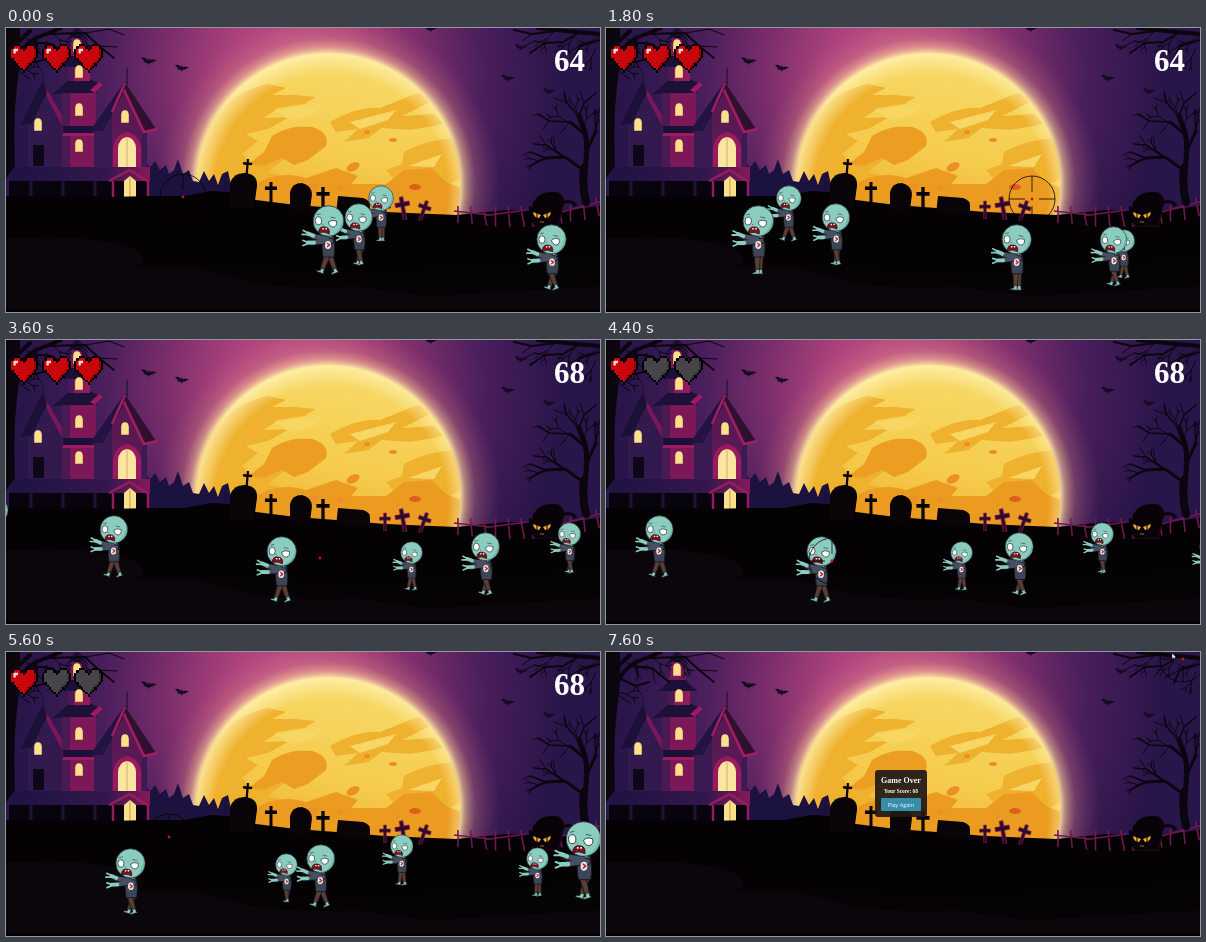
These frames come from a looping animation (594 px wide and 284 px high, 7.7 s). An HTML page:

```html
<!DOCTYPE html>
<html lang="en">
<head>
<meta charset="utf-8">
<title>Graveyard shooter</title>
<style>
  html, body { margin: 0; width: 100%; height: 100%; overflow: hidden; background: #000; }
  svg { display: block; width: 594px; height: 284px; }
  .serif { font-family: "Liberation Serif", serif; font-weight: bold; fill: #fff; }
  .branch { fill: none; stroke: #0b050d; stroke-linecap: round; stroke-linejoin: round; }
</style>
</head>
<body>
<svg viewBox="0 0 594 284">
  <defs>
    <radialGradient id="sky" gradientUnits="userSpaceOnUse" cx="288" cy="45" r="320">
      <stop offset="0" stop-color="#c8558a"/>
      <stop offset=".2" stop-color="#ae437c"/>
      <stop offset=".4" stop-color="#7b2e6b"/>
      <stop offset=".6" stop-color="#491e5c"/>
      <stop offset=".85" stop-color="#28154a"/>
    </radialGradient>
    <radialGradient id="glow" gradientUnits="userSpaceOnUse" cx="322" cy="157" r="172">
      <stop offset=".765" stop-color="#ffeaa8" stop-opacity=".95"/>
      <stop offset=".8" stop-color="#f6c795" stop-opacity=".6"/>
      <stop offset=".86" stop-color="#dd8f86" stop-opacity=".28"/>
      <stop offset="1" stop-color="#c06080" stop-opacity="0"/>
    </radialGradient>
    <radialGradient id="rim" gradientUnits="userSpaceOnUse" cx="325" cy="163" r="139">
      <stop offset=".84" stop-color="#fff2b4" stop-opacity="0"/>
      <stop offset="1" stop-color="#fff2b4" stop-opacity=".85"/>
    </radialGradient>
    <linearGradient id="moon" x1=".6" y1="0" x2=".4" y2="1">
      <stop offset="0" stop-color="#f7db6a"/>
      <stop offset=".4" stop-color="#f5cb4b"/>
      <stop offset=".75" stop-color="#eca42a"/>
    </linearGradient>
    <linearGradient id="porch">
      <stop offset=".1" stop-color="#211344"/>
      <stop offset=".7" stop-color="#35174e"/>
      <stop offset="1" stop-color="#85195a"/>
    </linearGradient>
    <clipPath id="disc"><circle cx="322" cy="157" r="132"/></clipPath>

    <path id="bat" d="M-8-3Q-4-5-1-1L0-3 1-1Q5-3 8 0 4 0 3 2 1 1 0 4-2 1-4 2-5-1-8-3Z" fill="#170a24"/>
    <path id="cross" d="M-1.5 20V8H-6V4.500H-1.500V0H1.500V4.500H6V8H1.500V20Z"/>
    <path id="window" d="M-4 6V-2Q-4-7 0-7T4-2V6Z" fill="#fbe08a"/>
    <g id="heart" shape-rendering="crispEdges">
      <path fill="#000" d="M2 0h3v1h1v1h1v-1h1v-1h3v1h1v1h1v4h-1v1h-1v1h-1v1h-1v1h-1v1h-1v1h-1v-1h-1v-1h-1v-1h-1v-1h-1v-1h-1v-1h-1v-4h1v-1h1z"/>
      <path fill="currentColor" d="M2 1h3v1h1v1h1v-1h1v-1h3v1h1v4h-1v1h-1v1h-1v1h-1v1h-1v1h-1v-1h-1v-1h-1v-1h-1v-1h-1v-1h-1v-4h1z"/>
      <path fill="#000" opacity=".28" d="M11 2h1v4h-1v1h-1v1h-1v1h-1v1h-1v-1h1v-1h1v-1h1v-1h1z"/>
    </g>
  </defs>

  <rect width="594" height="284" fill="url(#sky)"/>
  <circle cx="322" cy="157" r="172" fill="url(#glow)"/>
  <circle cx="322" cy="157" r="132" fill="url(#moon)"/>
  <g clip-path="url(#disc)">
    <path fill="#efb22f" d="M190 160Q190 110 216 80 238 60 262 56L280 60 266 67 288 67 310 69 298 76 272 80 258 90 284 89 262 101 240 106 252 113 236 126 246 135 268 124 282 128 262 144 290 152 262 166 230 182H190Z"/>
    <path fill="#eb9e22" d="M266 108Q284 96 306 99 324 104 320 118L302 132 288 137 276 130 258 138 243 136 258 124Z"/>
    <path fill="#efb22f" d="M324 94Q352 78 374 80L414 64 424 74 396 88 428 86 438 96 404 102 376 100 362 110 338 114 352 101 330 104Z"/>
    <path fill="#efb22f" d="M398 124Q420 112 447 110L456 150 440 158 418 150 390 154 380 142 396 136Z"/>
    <path fill="#eb9c20" d="M250 156Q274 142 300 150L330 140 352 148 345 156 380 156 398 142 426 140 440 154 455 160V190H232L240 170Z"/>
    <path fill="#f7d663" d="M268 82L318 76 308 86 284 92ZM344 94L390 82 382 92 354 101ZM402 138L436 126 428 139Z"/>
    <g fill="#ec8f26">
      <ellipse cx="347" cy="139" rx="7" ry="4" transform="rotate(-25 347 139)"/>
      <ellipse cx="334" cy="160" rx="5" ry="3"/>
      <ellipse cx="361" cy="104" rx="3" ry="2"/>
      <ellipse cx="387" cy="112" rx="4" ry="2"/>
      <ellipse cx="307" cy="158" rx="6" ry="3"/>
      <ellipse cx="409" cy="159" rx="6" ry="3" fill="#dd5d1c"/>
      <circle cx="392" cy="165" r="2"/>
    </g>
    <circle cx="322" cy="157" r="132" fill="url(#rim)"/>
  </g>

  <g id="bats"></g>

  <path fill="#1c1240" d="M132 184V142L139 134 144 139 149 133 154 142 160 137 163 146 168 142 172 131 177 146 183 142 187 153 193 154 198 143 203 153 208 146 212 157 216 146 222 143 225 157 232 161V184Z"/>

  <!-- house -->
  <path fill="#331a4e" d="M22 140V88L38 62 58 88V140Z"/>
  <path fill="#7a1758" d="M40 60L60 94 55 96 36 60Z"/>
  <path fill="#1b1038" d="M14 97L37 52 41 65 25 96Z"/>
  <rect x="27" y="117" width="11" height="21" fill="#0d0718"/>
  <path fill="#4c1a53" d="M56 140V58H64V140Z"/>
  <path fill="#7d1858" d="M64 140V58H90V140Z"/>
  <path fill="#1b1038" d="M57 98H91V105H57ZM46 67L62 52H85L97 57 90 65H57Z"/>
  <path fill="#9b1a60" d="M89 65L97 57 93 54 84 62ZM57 105H91V108H57Z"/>
  <path fill="#4c1a53" d="M62 53V34H68V53Z"/>
  <path fill="#911a5d" d="M68 53V34H84V53Z"/>
  <path fill="#1b1038" d="M52 39Q62 32 64 26H79Q82 32 92 39Z"/>
  <path fill="#7d1858" d="M63 28L66 9H77L80 28Z"/>
  <path fill="#1b1038" d="M60 13L69 0H73L83 13 77 10H66Z"/>
  <path fill="#3a1a52" d="M88 140V97L104 80 141 98V140Z"/>
  <path fill="#591a54" d="M106 140V86L119 64 136 96V140Z"/>
  <path fill="#221342" d="M84 103L119 53 119 62 97 103Z"/>
  <path fill="#30102f" d="M119 54L150 101 138 104 117 63Z"/>
  <path fill="none" stroke="#a41c62" stroke-width="2.500" d="M119 55L106 84M118 62L138 104 151 101"/>
  <path stroke="#28143f" stroke-width="1.500" d="M121 40V56M37 44V56"/>
  <path fill="#991b5f" d="M107 140V122Q108 106 121 104 134 106 135 122V140Z"/>
  <path fill="#fbe6a0" d="M112 139V120Q113 110 121 109 129 110 130 120V139Z"/>
  <path stroke="#d9a872" d="M121 109V139"/>
  <g id="windows"></g>
  <rect x="3" y="139" width="141" height="15" fill="url(#porch)"/>
  <path fill="#08040e" d="M3 153H143V176H3Z"/>
  <path stroke="#221036" stroke-width="3" d="M25 153V168M57 153V168M89 153V168"/>
  <path stroke="#991b5f" stroke-width="2.500" fill="none" d="M107 170V153M142 153V170M103 153L124 142 141 153"/>
  <path fill="#fbe08a" d="M118 170V153L124 148 130 153V170Z"/>
  <path stroke="#c88e58" d="M124 150V170"/>

  <!-- ground and graves -->
  <path fill="#050203" d="M0 168L60 170 145 168 178 168 205 163 224 164 250 172 290 177 330 180 380 184 450 187 500 182 545 184 594 178V284H0Z"/>
  <g fill="#090408">
    <path d="M224 180V155Q228 144 240 145 252 147 251 158L248 180Z"/>
    <path d="M284 182V164Q286 155 296 155 306 158 306 166L304 182Z"/>
    <path d="M330 186L332 168 357 170Q365 172 364 180V186Z"/>
    <use href="#cross" transform="translate(242 131) rotate(5) scale(.75)"/>
    <use href="#cross" transform="translate(265 154)"/>
    <use href="#cross" transform="translate(317 159) scale(1.100)"/>
  </g>
  <g fill="#2a0b29" stroke="#8f1a52" stroke-width=".6">
    <use href="#cross" transform="translate(379 173) scale(.9)"/>
    <use href="#cross" transform="translate(395 169) rotate(-10) scale(1.200)"/>
    <use href="#cross" transform="translate(421 173) rotate(20) scale(1.050)"/>
  </g>
  <g id="fence" fill="none" stroke="#711753" stroke-width="1.600"></g>
  <path fill="#050203" d="M370 191Q450 193 500 200T594 188V284H370Z"/>
  <path fill="#0a060c" d="M0 211Q65 205 122 218 152 233 125 240 190 236 222 248 265 262 350 258L420 268 594 258V281H0Z"/>
  <path fill="#060304" d="M120 239Q180 228 238 237T390 243L594 230V258L420 266 350 257Q265 261 222 248 190 236 120 239Z"/>

  <!-- cat -->
  <path fill="#080308" stroke="#3c1130" stroke-width=".6" d="M525 181L527 174 532 168Q540 162 552 164 561 169 557 180L553 198H528Z"/>
  <path fill="none" stroke="#0b050d" stroke-width="3" d="M553 176Q564 170 570 178"/>
  <path fill="#080308" d="M523 178L529 181H541L548 177 546 191Q543 198 534 198 525 197 524 190Z"/>
  <path fill="#f6a92c" d="M527 184L535 187 533 190Q528 190 527 184ZM545 184L537 187 539 190Q544 190 545 184Z"/>
  <path stroke="#000" d="M531 185V190M541 185V190"/>
  <path stroke="#cf8540" stroke-width=".8" d="M534 194H538"/>

  <!-- bare trees -->
  <path fill="#0b050d" d="M0 0H14Q15 28 11 58 7 92 9 138L0 150Z"/>
  <g class="branch">
    <path stroke-width="4" d="M8 42Q12 20 30 10L55 0M8 18L24 3"/>
    <path stroke-width="2" d="M23 14L46 16 63 30M43 6L79 5 93 18 108 30M15 27L30 34 43 30M30 12L32 24"/>
    <path stroke-width="1" d="M46 16L49 31M63 5L80 13 83 23M93 18L111 19M79 5L103 1 118 7M30 34L35 42M12 43L24 51"/>
    <path stroke-width="4" d="M594 6L560 3 532 0"/>
    <path stroke-width="2" d="M574 4L557 14 539 15 524 25M550 3L526 6 508 2M594 12L574 18 568 31"/>
    <path stroke-width="1" d="M557 14L549 24M539 15L529 13 518 18M526 6L516 13M574 18L560 25"/>
    <path stroke-width="8" d="M580 174Q576 158 578 140"/>
    <path stroke-width="5" d="M578 144Q583 122 579 104L573 88"/>
    <path stroke-width="3" d="M577 142L559 129 540 130M581 122L590 103M579 106L564 94"/>
    <path stroke-width="1.600" d="M573 88L560 74 558 64M573 88L578 75 590 65M564 94L543 93 532 86M540 130L524 124M558 129L540 117 528 116M590 103L589 85M540 130L524 138"/>
    <path stroke-width=".9" d="M560 74L548 70M543 93L537 101M532 86L527 88M540 117L534 108M578 75L574 63M524 124L517 127M564 94L554 106M589 85L594 79M550 123L547 109"/>
    <g id="twigs"></g>
  </g>
  <rect y="281" width="594" height="3" fill="#000"/>

  <g id="game">
    <g id="hearts"></g>
    <g id="horde"></g>
    <text id="score" class="serif" x="579" y="43" font-size="31" text-anchor="end">64</text>
  </g>

  <g id="over">
    <rect x="269" y="118" width="52" height="47" rx="3" fill="#201a16" opacity=".92"/>
    <g text-anchor="middle">
      <text class="serif" x="295" y="131" font-size="8">Game Over</text>
      <text class="serif" x="295" y="141" font-size="5.400">Your Score: 68</text>
      <rect x="275" y="146" width="40" height="13" rx="1" fill="#368eab"/>
      <text x="295" y="154.500" font-size="5.500" fill="#fff" font-family="Open Sans, sans-serif">Play Again</text>
    </g>
  </g>

  <g id="sight">
    <circle r="23" fill="none" stroke="#050203" opacity=".8"/>
    <path stroke="#050203" opacity=".8" d="M-23 0H-7M7 0H23M0-23V-7M0 7V23"/>
    <circle r="1.400" fill="#c8141f"/>
  </g>
  <path id="cursor" transform="translate(566 1)" fill="#fff" stroke="#000" stroke-width=".5" d="M0 0V6L1.500 4.700 2.400 6.500 3.300 6 2.500 4.400H4.300Z"/>
</svg>

<script>
const LOOP = 7700, STEP = 100, OVER = 5900;
const $ = id => document.getElementById(id);
const show = (el, on) => el.setAttribute('display', on ? 'inline' : 'none');
const place = (el, x, y, s = 1) => el.setAttribute('transform', `translate(${x} ${y}) scale(${s})`);

function add(parent, tag, attrs, html = '') {
  const el = document.createElementNS('http://www.w3.org/2000/svg', tag);
  for (const k in attrs) el.setAttribute(k, attrs[k]);
  el.innerHTML = html;
  return parent.appendChild(el);
}

for (const [x, y, s] of [[143, 33, 1], [176, 40, .9], [425, 0, 1], [502, 50, .9], [515, 19, .8], [543, 63, .8]])
  place(add($('bats'), 'use', { href: '#bat' }), x, y, s);
for (const [x, y] of [[71, 18], [73, 44], [73, 82], [73, 118], [32, 97], [119, 89]])
  place(add($('windows'), 'use', { href: '#window' }), x, y, .95);

let fence = 'M448 183L484 187 521 182M548 186L594 174';
for (let i = 0; i < 12; i++) {
  const x = 452 + i * 12.5, y = 188 - Math.max(0, i - 6) * 1.8;
  fence += `M${x} ${y - 10}L${x + (i % 3) * 2} ${y + 11}`;
}
add($('fence'), 'path', { d: fence });

// fine forked twigs at the branch tips
let seed = 7;
const rand = () => (seed = seed * 16807 % 2147483647) / 2147483647;
function grow(x, y, angle, len) {
  if (len < 4) return '';
  const x2 = x + Math.cos(angle) * len, y2 = y + Math.sin(angle) * len;
  return `M${x} ${y}L${x2} ${y2}` + [-.5, .5].map(a => grow(x2, y2, angle + a + rand() * .4 - .2, len * .68)).join('');
}
const tips = [[20, 10, .6], [46, 4, .8], [70, 5, .9], [10, 40, .2], [594, 8, 2.6], [570, 6, 2.2], [548, 4, 2.4], [590, 20, 2],
  [573, 90, -1.9], [577, 100, -1.2], [562, 94, -2.6], [558, 128, -2.5], [542, 130, 2.9], [588, 104, -1.2]];
add($('twigs'), 'path', { d: tips.map(p => grow(...p, 11)).join(''), 'stroke-width': .9 });

const hearts = [3, 36, 68].map(x => {
  const g = add($('hearts'), 'g', { transform: `translate(${x} 16) scale(2.250 2.400)` });
  add(g, 'use', { href: '#heart' });
  g.shine = add(g, 'path', { d: 'M2 2h2v1h-1v1h-1z', fill: '#f4dede' });
  return g;
});

const legShape = `<path d="M-2.800 0H3L2.200 14H-2Z" fill="#5a3e36" stroke="#17151b" stroke-width=".8"/>
  <path d="M-1.500 13.500H2V16.500L3 18H-5Q-5 16-1.500 16Z" fill="#8accbd" stroke="#17151b" stroke-width=".6"/>`;
const bodyShape = `<path d="M-5 14H5Q8 23 6 36H-5Q-7 25-5 14Z" fill="#3d4657" stroke="#17151b" stroke-width=".9"/>
  <path d="M-3 15L0 20 3 15Z" fill="#8accbd"/>`;
const arms = `<g fill="none" stroke-linecap="round" stroke-linejoin="round">
  <path d="M-1 18L-18 15M3 20L-17 22" stroke="#17151b" stroke-width="6"/>
  <path d="M-1 18L-15 15.500M3 20L-14 21.500" stroke="#465061" stroke-width="4.500"/>
  <path d="M-15 15L-20 13M-14 22L-20 22" stroke="#8accbd" stroke-width="4"/>
  <path d="M-19 13L-25 10M-20 14L-26 14M-19 22L-25 20M-20 23L-25 25" stroke="#8accbd" stroke-width="1.800"/></g>
  <ellipse cx="0" cy="24" rx="3" ry="4" fill="#ece9e6"/><path d="M-1 22L1.500 24-1 26" fill="none" stroke="#bd2534" stroke-width="1.500"/>`;
const headShape = `<circle r="15.300" fill="#8accbd" stroke="#21353b" stroke-width=".8"/>
  <path d="M4 14Q13 9 14-4 17 9 4 14Z" fill="#70b5aa"/>
  <ellipse cx="-10" cy="0" rx="3.200" ry="4" fill="#fff" stroke="#26373a" stroke-width=".8"/>
  <path d="M0 1Q3-2 8 0 9 5 5 6 1 6 0 1Z" fill="#fff" stroke="#26373a" stroke-width=".8"/>
  <path d="M-12-6L-8-7M2-4L7-3M-6 3L-5 4" stroke="#35555a" stroke-width=".8"/>
  <path d="M-10 12Q-9 5-4 6 2 6 1 13-4 10-10 12Z" fill="#85101d" stroke="#241016" stroke-width=".8"/>
  <path d="M-6 7H-4.500V8.500H-6ZM-3 7H-1.500V8.500H-3Z" fill="#fff"/>`;

// head x at time zero, pixels per step, foot y, height, time of death
const horde = [
  [375, 10.7, 213, 55], [866, 8.4, 233, 50], [353, 6.82, 237, 61], [873, 6.1, 244, 48],
  [322, 9.43, 246, 68], [1082, 9, 247, 77], [630, 6.24, 250, 48], [778, 8.28, 255, 62],
  [706, 11, 258, 59, 3600], [546, 7.52, 262, 65]
].map(([x, v, foot, h, dies = OVER], i) => {
  const el = add($('horde'), 'g', {});
  const far = add(el, 'g', {}, legShape), near = add(el, 'g', {}, legShape);
  add(el, 'g', {}, bodyShape);
  const top = add(el, 'g', {}, arms + headShape);
  return { el, far, near, top, x, v, foot, s: h / 68, dies, phase: i * 1.9 };
});

const aim = [[0, 177, 169], [900, 177, 169], [1500, 400, 178], [1800, 426, 171], [2400, 395, 176], [2900, 325, 172],
  [3300, 337, 205], [3600, 314, 218], [4000, 245, 220], [4400, 226, 221], [5000, 190, 206], [5600, 163, 185],
  [6400, 295, 152], [7200, 577, 7], [7700, 577, 7]];
const scores = [[0, 64], [2100, 61], [2500, 58], [3600, 68]];
const losses = [3900, 4000];

function aimAt(t) {
  const i = aim.findIndex(p => p[0] > t), [t0, x0, y0] = aim[i - 1], [t1, x1, y1] = aim[i];
  const k = (t - t0) / (t1 - t0);
  return [x0 + (x1 - x0) * k, y0 + (y1 - y0) * k];
}

function draw(t) {
  const n = t / STEP, over = t >= OVER;
  show($('game'), !over);
  show($('over'), over);
  show($('cursor'), t >= 7200);
  place($('sight'), ...aimAt(t));
  $('score').textContent = scores.filter(s => s[0] <= t).pop()[1];

  const lives = 3 - losses.filter(l => l <= t).length;
  hearts.forEach((h, i) => {
    h.setAttribute('color', i < lives ? '#c8060c' : '#484548');
    show(h.shine, i < lives);
  });

  for (const z of horde) {
    const x = z.x - z.v * n, swing = Math.sin(n * .8 + z.phase);
    show(z.el, t < z.dies && x > -50 && x < 630);
    place(z.el, x, z.foot - 53 * z.s, z.s);
    z.far.setAttribute('transform', `translate(2 35) rotate(${-20 * swing})`);
    z.near.setAttribute('transform', `translate(-1 35) rotate(${20 * swing})`);
    z.top.setAttribute('transform', `rotate(${swing * 1.2} 0 24)`);
  }
}

const start = performance.now();
function tick() {
  const t = (performance.now() - start) % LOOP;
  draw(Math.floor(t / STEP) * STEP);
  requestAnimationFrame(tick);
}
tick();
</script>
</body>
</html>
```
